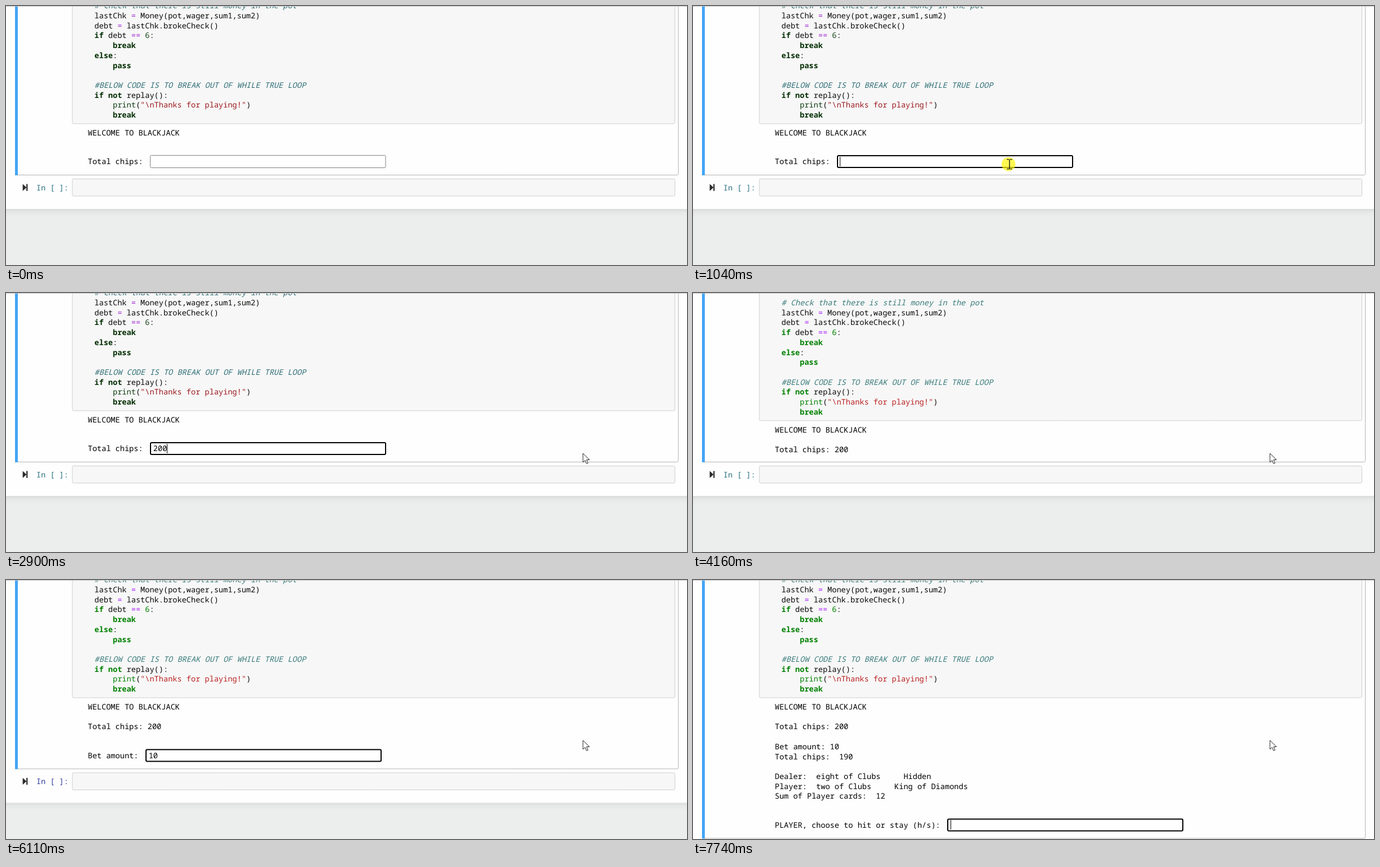
Animation of 1211x462 px, one loop 8000 ms. Source, as an HTML page with a canvas:

```html
<!DOCTYPE html>
<html lang="en">
<head>
<meta charset="utf-8">
<title>Notebook card game</title>
<style>
  html, body { margin: 0; width: 100%; height: 100%; overflow: hidden; background: #eceeed; }
  canvas { display: block; }
</style>
</head>
<body>
<canvas id="stage" width="1211" height="462"></canvas>
<script>
const ctx = document.getElementById('stage').getContext('2d');
const W = 1211, H = 462, LOOP = 8000;
const LINE = 17.7, CHAR = 8.178, FONT = '13.63px "Noto Sans Mono", monospace';
const OUT_X = 145.5, CODE_X = 157.3;

const CODE = [
  '# Check that there is still money in the pot',
  'lastChk = Money(pot,wager,sum1,sum2)',
  'debt = lastChk.brokeCheck()',
  'if debt == 6:',
  '    break',
  'else:',
  '    pass',
  '',
  '#BELOW CODE IS TO BREAK OUT OF WHILE TRUE LOOP',
  'if not replay():',
  '    print("\\nThanks for playing!")',
  '    break'
];
const TOKEN = /(#.*|".*"|\b(?:if|not|else|break|pass|print)\b|=+|\b\d+\b)/;
const DIM = { comment: '#2f6f76', string: '#9c1a1e', keyword: '#002c00', builtin: '#0c3c10', number: '#1c4c20', op: '#a22bd6' };
const VIVID = { comment: '#3a7b7b', string: '#ba2121', keyword: '#008000', builtin: '#008000', number: '#008000', op: '#aa22ff' };

const OUTPUT = [
  'WELCOME TO BLACKJACK', '',
  'Total chips: 200', '',
  'Bet amount: 10',
  'Total chips:  190', '',
  'Dealer:  eight of Clubs     Hidden',
  'Player:  two of Clubs     King of Diamonds',
  'Sum of Player cards:  12'
];

// Each scene: start time, output lines shown, scroll offset, cell bottom, optional prompt
const SCENES = [
  { at: 0, lines: 1, shift: 0, bottom: 301.5, ask: 'Total chips: ', y: 277.5,
    focus: 1040, keys: [[2530, '2'], [2750, '20'], [2900, '200']], blink: [1590, 2140, 3450, 4010] },
  { at: 4160, lines: 3, shift: LINE, bottom: 301.5 },
  { at: 4230, lines: 3, shift: 0, bottom: 336.9, ask: 'Bet amount: ', y: 313,
    focus: 4230, keys: [[5390, '1'], [5560, '10']], blink: [4690, 5240, 6110] },
  { at: 6640, lines: 10, shift: 0, bottom: 407.5 },
  { at: 6730, lines: 10, shift: 0, bottom: 460.8, ask: 'PLAYER, choose to hit or stay (h/s): ', y: 437,
    focus: 6730, keys: [], blink: [7200, 7740] }
];

const lastBefore = (list, t, time) => list.filter(item => time(item) <= t).pop();

function text(str, x, y, color = '#000', style = '') {
  ctx.font = style + ' ' + FONT;
  ctx.fillStyle = color;
  ctx.fillText(str, x, y);
}

function box(x, y, w, h, fill, stroke, lineWidth = 1, radius = 2) {
  ctx.beginPath();
  ctx.roundRect(x, y, w, h, radius);
  ctx.fillStyle = fill;
  ctx.fill();
  ctx.strokeStyle = stroke;
  ctx.lineWidth = lineWidth;
  ctx.stroke();
}

function tokenKind(part) {
  if (part[0] === '#') return 'comment';
  if (part[0] === '"') return 'string';
  if (part[0] === '=') return 'op';
  if (part === 'print') return 'builtin';
  return /^\d/.test(part) ? 'number' : 'keyword';
}

function drawCode(shift, palette) {
  CODE.forEach((line, row) => {
    let col = 0;
    line.split(TOKEN).forEach((part, i) => {
      const kind = i % 2 ? tokenKind(part) : '';
      const style = { comment: 'italic', keyword: 'bold' }[kind] || '';
      text(part, CODE_X + col * CHAR, 4.3 + row * LINE + shift, palette[kind] || '#0a0a0a', style);
      col += part.length;
    });
  });
}

function drawPage(bottom) {
  ctx.fillStyle = '#eceeed';
  ctx.fillRect(0, 0, W, H);
  ctx.save();
  ctx.shadowColor = 'rgba(87,87,87,.24)';
  ctx.shadowBlur = 13;
  ctx.fillStyle = '#fefefe';
  ctx.fillRect(-20, -20, W + 40, bottom + 20);
  ctx.restore();
}

function drawNextCell(bottom, color) {
  box(118, bottom + 7, 1071.5, 30.5, '#f7f7f7', '#cfcfcf');
  text('In [ ]:', 54, bottom + 27.2, color);
  const y = bottom + 16;
  ctx.fillStyle = '#2b2b2b';
  ctx.beginPath();
  ctx.moveTo(29.7, y);
  ctx.lineTo(36.5, y + 6.2);
  ctx.lineTo(29.7, y + 12.4);
  ctx.fill();
  ctx.fillRect(36.2, y, 2.2, 12.4);
}

function drawPrompt(scene, t) {
  const { ask, y } = scene;
  const focused = t >= scene.focus;
  const x = OUT_X + ask.length * CHAR + 4.2;
  text(ask, OUT_X, y + 4.5);
  if (focused) box(Math.round(x) + 1, y - 10.5, 418, 21, '#fff', '#000', 2);
  else box(Math.round(x) + .5, y - 11, 418.5, 22, '#fff', '#808080');
  if (!focused) return;

  const key = lastBefore(scene.keys, t, k => k[0]);
  const typed = key ? key[1] : '';
  text(typed, x + 5.8, y + 4.5);

  // Typing restarts the caret in its visible state
  const since = key ? key[0] : scene.focus;
  const flips = scene.blink.filter(b => b > since && b <= t).length;
  if (flips % 2 === 0) {
    ctx.fillStyle = '#000';
    ctx.fillRect(Math.floor(x + 5.8 + typed.length * CHAR), Math.round(y - 9), 1, 17);
  }
}

function pointerAt(t) {
  if (t < 70) return null;
  if (t < 130) return [1056, 395];
  if (t < 190) return [868, 345];
  if (t < 1210) {
    const step = Math.max(0, Math.floor((t - 350) / 78) + 1);
    const p = Math.min(1, step / 9);
    const e = 1 - (1 - p) ** 2;
    return [726 - 163 * e, 323 - 41 * e];
  }
  if (t < 1280) return [690, 270];
  if (t < 1350) return [860, 264];
  if (t < 1420) return [985, 276];
  return [1026, 286];
}

function drawArrow(x, y) {
  const points = [[0, 0], [0, 16], [3.8, 12.5], [6.4, 18.4], [9, 17.3], [6.4, 11.5], [11.5, 11.5]];
  ctx.beginPath();
  points.forEach(([dx, dy]) => ctx.lineTo(x + dx, y + dy));
  ctx.closePath();
  ctx.fillStyle = '#fff';
  ctx.fill();
  ctx.strokeStyle = '#222';
  ctx.lineWidth = 1;
  ctx.stroke();
}

function drawBeam(x, y) {
  ctx.fillStyle = '#222';
  x = Math.round(x);
  y = Math.round(y);
  ctx.fillRect(x - 1, y - 8, 1.5, 17);
  for (const dy of [-9, 8]) {
    ctx.fillRect(x - 5, y + dy, 4, 1.3);
    ctx.fillRect(x + .5, y + dy, 4, 1.3);
  }
}

function drawPointer(t) {
  const pos = pointerAt(t);
  if (!pos) return;
  const [x, y] = pos;
  if (t >= 1040 && t < 1130) {
    ctx.fillStyle = 'rgba(255,244,0,.68)';
    ctx.beginPath();
    ctx.arc(561, 282, 12.3, 0, Math.PI * 2);
    ctx.fill();
  }
  const overInput = x > 256 && x < 675 && y > 266 && y < 289;
  const overCell = x > 118 && x < 1190 && y > 308 && y < 339;
  (overInput || overCell ? drawBeam : drawArrow)(x, y);
}

function draw(t) {
  const scene = lastBefore(SCENES, t, s => s.at);
  const { shift, bottom } = scene;
  drawPage(bottom + 60.5);

  box(16.5, -10, 1179, bottom + 10, '#fefefe', '#b4b4b4');
  ctx.fillStyle = '#42a5f5';
  ctx.fillRect(16, 0, 5, bottom + .5);
  box(118, -10, 1071.5, 220 + shift, '#f7f7f7', '#cfcfcf');

  drawCode(shift, t < 4160 ? DIM : VIVID);
  OUTPUT.slice(0, scene.lines).forEach((line, i) => text(line, OUT_X, 231 + shift + i * LINE));
  if (scene.ask) drawPrompt(scene, t);
  drawNextCell(bottom, t < 4230 ? '#2a7080' : '#303f9f');

  ctx.fillStyle = '#c2c2c2';
  ctx.fillRect(0, 0, W, 1);
  drawPointer(t);
}

function tick() {
  ctx.textRendering = 'geometricPrecision';
  draw(performance.now() % LOOP);
  requestAnimationFrame(tick);
}
tick();
</script>
</body>
</html>
```
